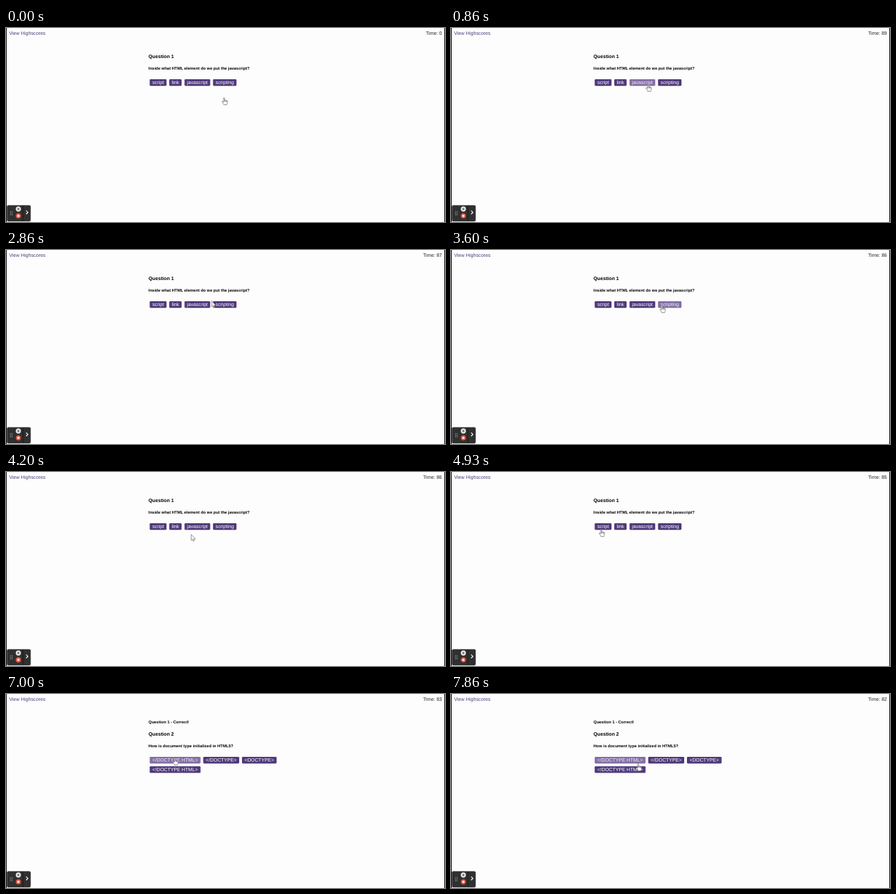
These frames come from a looping animation (640 by 284 pixels, 8 s). An HTML page:

```html
<!DOCTYPE html>
<html lang="en">
<head>
<meta charset="utf-8">
<title>Quiz</title>
<style>
  html, body { margin: 0; width: 100%; height: 100%; overflow: hidden; background: #fdfdfd; }
  svg { display: block; width: 100vw; height: 100vh; }
  text { font: 7.16px "Liberation Sans", Arial, sans-serif; fill: #222; text-rendering: geometricPrecision; }
  .head { font-weight: bold; fill: #000; }
  .small { font-weight: bold; font-size: 5.94px; fill: #000; }
  .link { fill: #4e3c7a; }
  .btn rect { fill: #4f3a7b; }
  .btn.hover rect { fill: #8370a6; }
  .btn text { fill: #fff; text-anchor: middle; }
  .btn.hover text { fill: #f2eff7; }
  .cursor { fill: #fff; stroke: #555; stroke-width: .65; stroke-linejoin: round; stroke-linecap: round; }
</style>
</head>
<body>
<svg viewBox="0 0 640 284">
  <rect width="640" height="284" fill="#fdfdfd"/>
  <path d="M.5 0V284M639.5 0V284" stroke="#111"/>
  <text class="link" x="4.4" y="10.3">View Highscores</text>
  <text id="time" x="635.6" y="10.3" text-anchor="end"></text>
  <g id="page1">
    <text class="head" x="207.8" y="44.4">Question 1</text>
    <text class="small" x="207.8" y="61.2">Inside what HTML element do we put the javascript?</text>
  </g>
  <g id="page2">
    <text class="small" x="207.8" y="43">Question 1 - Correct!</text>
    <text class="head" x="207.8" y="61">Question 2</text>
    <text class="small" x="207.8" y="78">How is document type initialized in HTML5?</text>
  </g>
  <g>
    <rect x="1" y="259.2" width="35.6" height="24.6" rx="2.5" fill="#bbb" opacity=".6"/>
    <rect x="1.3" y="259.5" width="34.6" height="23.4" rx="2" fill="#303030"/>
    <path d="M6.7 268.5v5.5M9 268.5v5.5" stroke="#bbb" stroke-width="1.1" stroke-dasharray="1.1 1.1"/>
    <path d="M24.7 260v22.5" stroke="#151515" stroke-width=".8"/>
    <circle cx="18" cy="265" r="3.7" fill="#eee"/>
    <path d="M17.2 263.4v3.2M18.8 263.4v3.2" stroke="#333" stroke-width=".9"/>
    <circle id="rec" cx="18" cy="275" fill="#e8503c"/>
    <rect x="16.5" y="273.5" width="3" height="3" rx=".6" fill="#fff"/>
    <path d="M29.4 267.3l2.5 2.6-2.5 2.6" fill="none" stroke="#fff" stroke-width="1.2"/>
  </g>
  <g id="cursor" class="cursor">
    <path id="arrow" d="M0 0V8.2L1.9 6.5 3.2 9.4 4.5 8.8 3.2 6H5.8Z"/>
    <g id="hand">
      <path d="M-1 .7Q-1-.1-.2-.1T.7.7V4Q1.6 3.3 2.2 4.1 3 3.6 3.6 4.5 4.8 4.2 4.8 5.4V7.2Q4.8 8.5 4 9.2V10.4H-.6V9.4L-3 6.3Q-3.2 5.1-2.1 5.2L-1 6.2Z"/>
      <path d="M.7 4v1.6M2.2 4.2v1.5M3.6 4.6v1.3" fill="none"/>
    </g>
  </g>
</svg>
<script>
const LOOP = 8000, CLICK = 5330, LAG = 60;
const $ = id => document.getElementById(id);

// time, x, y of the pointer tip
const path = [
  [0, 318, 102], [60, 318, 102], [260, 304, 94], [460, 304, 94], [1000, 284, 80],
  [1530, 272.5, 81], [2200, 262, 80], [2860, 300, 75], [3450, 312, 80], [4200, 270, 92],
  [4700, 229, 95], [4930, 219, 84], [5150, 219, 82], [6460, 219, 82],
  [7200, 252, 96], [7780, 271, 100], [7860, 273, 102.2], [LOOP, 273, 102.2]
];

function addButton(page, x, y, w, label) {
  const g = document.createElementNS("http://www.w3.org/2000/svg", "g");
  g.setAttribute("class", "btn");
  g.innerHTML = `<rect x="${x}" y="${y}" width="${w}" height="9.8" rx="1.4"/>
    <text x="${x + w / 2}" y="${y + 7.2}"></text>`;
  g.querySelector("text").textContent = label;
  $("page" + page).append(g);
  return { page, x, y, w, g };
}

const buttons = [
  [1, 209.5, 74.9, 24.5, "script"],
  [1, 238, 74.9, 18, "link"],
  [1, 260.3, 74.9, 37.4, "javascript"],
  [1, 301.8, 74.9, 34.2, "scripting"],
  [2, 209.5, 91.9, 74.1, "</DOCTYPE HTML>"],
  [2, 287.5, 91.9, 52.5, "</DOCTYPE>"],
  [2, 344, 91.9, 50.5, "<DOCTYPE>"],
  [2, 209.5, 105.8, 74.1, "<!DOCTYPE HTML>"]
].map(b => addButton(...b));

function pointer(t) {
  const i = Math.max(1, path.findIndex(p => p[0] >= t));
  const [t0, x0, y0] = path[i - 1], [t1, x1, y1] = path[i];
  const u = Math.max(0, (t - t0) / (t1 - t0)), k = u * u * (3 - 2 * u);
  return [x0 + (x1 - x0) * k, y0 + (y1 - y0) * k];
}

function buttonAt(t) {
  const [x, y] = pointer(Math.max(0, t)), page = t < CLICK ? 1 : 2;
  return buttons.find(b => b.page === page &&
    x >= b.x && x <= b.x + b.w && y >= b.y && y <= b.y + 9.8);
}

const show = (id, on) => $(id).setAttribute("display", on ? "inline" : "none");

function draw(t) {
  $("time").textContent = "Time: " + (t < 480 ? 0 : 89 - Math.floor((t - 480) / 1000));
  show("page1", t < CLICK);
  show("page2", t >= CLICK);

  const lit = buttonAt(t - LAG);
  for (const b of buttons) b.g.classList.toggle("hover", b === lit);

  const hand = t < 130 || (t >= CLICK && t < 6470) || !!(lit || buttonAt(t));
  show("hand", hand);
  show("arrow", !hand);
  $("cursor").setAttribute("transform", `translate(${pointer(t)})`);

  const still = t > 5730 && t < 6460 ? 5730 : t;
  $("rec").setAttribute("r", 3.75 + 0.15 * Math.sin(still * Math.PI / 500));
}

const start = performance.now();
function tick() {
  draw((performance.now() - start) % LOOP);
  requestAnimationFrame(tick);
}
tick();
</script>
</body>
</html>
```
